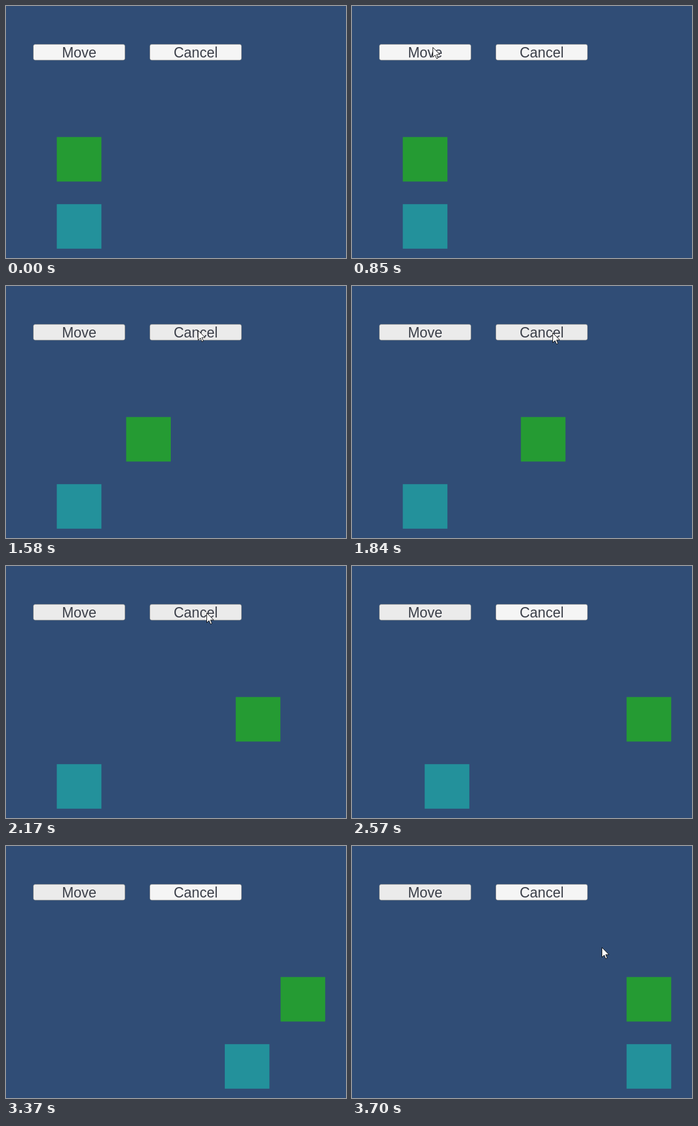
Recreate the animation shown at these times as an HTML page with a canvas. Size 553 by 411 pixels, loop 3.77 s.

```html
<!DOCTYPE html>
<html lang="en">
<head>
<meta charset="utf-8">
<title>Move and cancel</title>
<style>
  html, body { margin: 0; width: 100%; height: 100%; overflow: hidden; background: #304d76; }
  canvas { display: block; }
</style>
</head>
<body>
<canvas id="stage" width="553" height="411"></canvas>
<script>
const ctx = document.getElementById('stage').getContext('2d');
const LOOP = 3770;
const SIZE = 72.6, LEFT = 82.6, RIGHT = 446.6, SPEED = 19.8;
const NORMAL = 245, SELECTED = 235, PRESSED = 200;

const ENTRY = [267, 270], MOVE = [131, 67], CANCEL = [326, 76], EXIT = [407, 92];
const RETURN = [470, 170], REST = [406, 165];
const arrow = new Path2D('M.5 .5V16.5L4.2 13L6.7 18.8L9 17.8L6.6 12.1H11.8Z');

const clamp = p => Math.max(0, Math.min(1, p));
const smooth = p => p * p * (3 - 2 * p);
const mix = (a, b, p) => a.map((v, i) => v + (b[i] - v) * p);

// The picture advances about 15 times a second, with a pause before the press.
const approachStep = t => Math.min(9, Math.floor((t - 245) / 66.67));
const actionStep = t => Math.floor((t - 1105) / 66.4);

// Both squares cross the stage at one constant speed.
const slide = (step, from) => Math.min(RIGHT, LEFT + SPEED * Math.max(0, step - from));

function cursorAt(t, step) {
  if (t < 250) return null;
  if (step < 0) return mix(MOVE, ENTRY, (1 - approachStep(t) / 9) ** 2.4);
  if (step < 16) {
    const p = smooth(clamp((step - 2) / 6));
    const [x, y] = mix(MOVE, CANCEL, p);
    return [x, y - 16 * Math.sin(Math.PI * p)];
  }
  if (step < 20) return mix(CANCEL, EXIT, clamp((step - 16) / 3));
  return step < 38 ? null : mix(RETURN, REST, clamp(step - 38));
}

function moveShade(step) {
  if (step < 0) return NORMAL;
  return SELECTED - (SELECTED - PRESSED) * clamp(1 - Math.abs(step - 1) * 0.57);
}

function button(x, label, shade) {
  ctx.beginPath();
  ctx.roundRect(x, 62.6, 149, 25.7, 3);
  ctx.fillStyle = `rgb(${shade}, ${shade}, ${shade})`;
  ctx.fill();
  ctx.strokeStyle = 'rgba(125, 122, 112, .5)';
  ctx.lineWidth = 1;
  ctx.stroke();
  ctx.fillStyle = '#3b3f49';
  ctx.fillText(label, x + 74.5, 83.8);
}

function square(x, y, fill) {
  ctx.fillStyle = fill;
  ctx.fillRect(x, y, SIZE, SIZE);
}

function cursor([x, y]) {
  ctx.save();
  ctx.translate(Math.round(x), Math.round(y));
  ctx.fillStyle = '#fff';
  ctx.strokeStyle = 'rgba(0, 0, 0, .85)';
  ctx.lineWidth = 1;
  ctx.fill(arrow);
  ctx.stroke(arrow);
  ctx.restore();
}

function draw(t) {
  const step = actionStep(t);
  const pointer = cursorAt(t, step);
  const overCancel = pointer && pointer[0] > 234 && pointer[0] < 383 && pointer[1] < 88;
  ctx.fillStyle = '#304d76';
  ctx.fillRect(0, 0, 553, 411);
  ctx.font = '23px "Liberation Sans", Arial, sans-serif';
  ctx.textAlign = 'center';
  button(44.5, 'Move', moveShade(step));
  button(234, 'Cancel', overCancel && step >= 0 ? SELECTED : NORMAL);
  square(slide(step, 1.3), 213.7, '#259b33');
  square(slide(step, 20.2), 323.2, '#23919b');
  if (pointer) cursor(pointer);
}

const start = performance.now();
function tick() {
  draw((performance.now() - start) % LOOP);
  requestAnimationFrame(tick);
}
tick();
</script>
</body>
</html>
```
